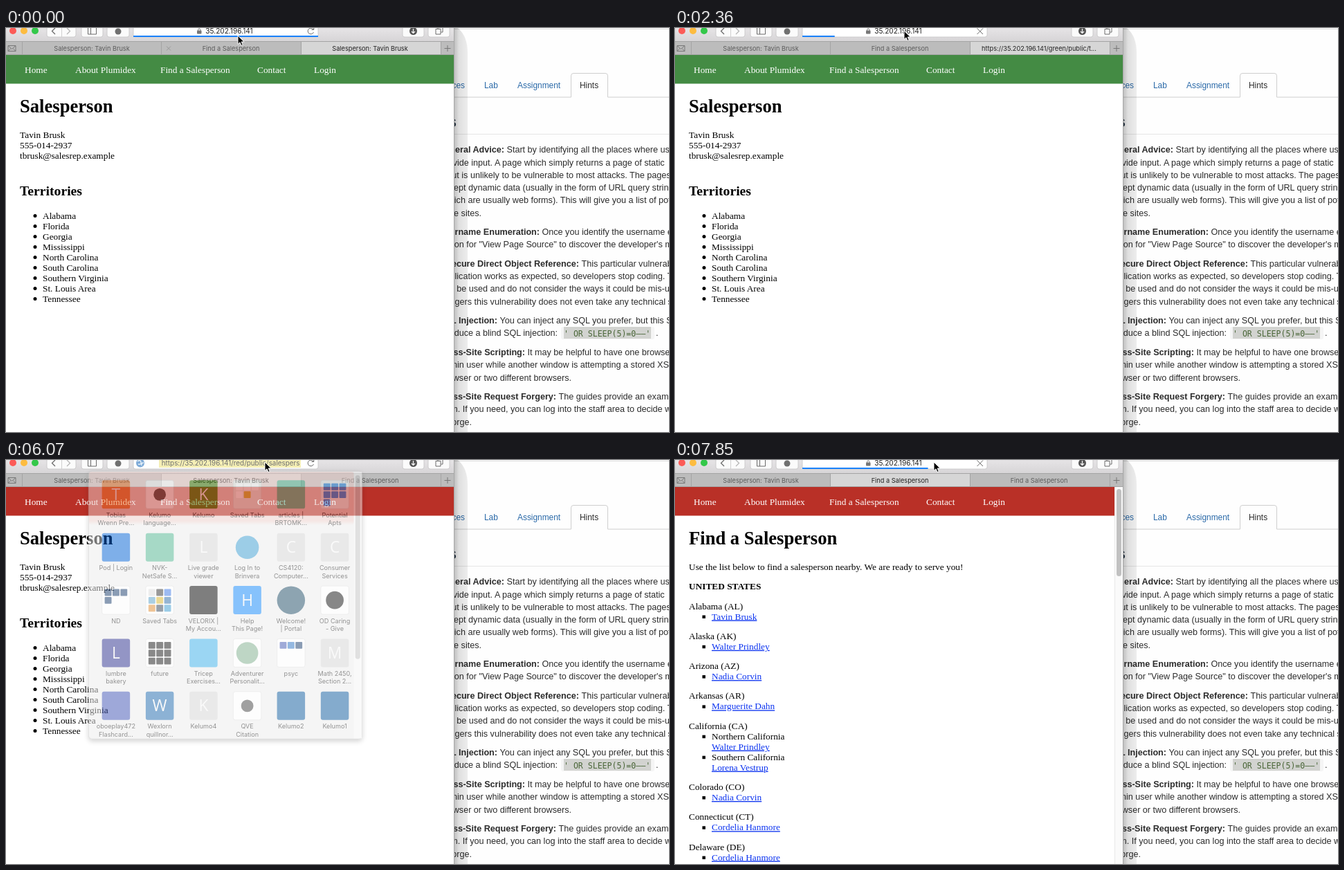
Write an HTML page that moves like this. It is 958 px wide and 584 px high and loops after 8000 ms.

```html
<!DOCTYPE html>
<html lang="en">
<head>
<meta charset="utf-8">
<title>Browser session</title>
<style>
html, body { margin: 0; width: 100%; height: 100%; overflow: hidden; background: #fff; }
svg { display: block; width: 958px; height: 584px; }
text { white-space: pre; }
.ui { font-family: Inter, sans-serif; }
.serif { font-family: "Liberation Serif", serif; font-size: 13.33px; }
.sans { font-family: "Liberation Sans", sans-serif; font-size: 12.6px; fill: #2c2c2c; }
.b { font-weight: bold; }
.mid { text-anchor: middle; }
.end { text-anchor: end; }
.link { fill: #0a32f0; text-decoration: underline; }
</style>
</head>
<body>
<svg id="stage" viewBox="0 0 958 584"></svg>
<script>
const text = (x, y, s, more = '') => `<text x="${x}" y="${y}" ${more}>${s}</text>`;
const rect = (x, y, w, h, fill, more = '') =>
  `<rect x="${x}" y="${y}" width="${w}" height="${h}" fill="${fill}" ${more}/>`;
const disc = (x, y, r, fill, more = '') => `<circle cx="${x}" cy="${y}" r="${r}" fill="${fill}" ${more}/>`;
const line = (d, stroke, w = 1, more = '') =>
  `<path d="${d}" fill="none" stroke="${stroke}" stroke-width="${w}" ${more}/>`;
const group = (id, body, more = '') => `<g id="${id}" ${more}>${body}</g>`;

const rep = 'Tavin Brusk';
const repTitle = 'Salesperson: ' + rep;
const listTitle = 'Find a Salesperson';
const ip = '35.202.196.141';

// Page behind the browser window
function guide() {
  const bold = [
    [180, 'General Advice:', 720, 'Start by identifying all the places where users'],
    [299, 'Username Enumeration:', 771, 'Once you identify the username enum'],
    [345, 'Insecure Direct Object Reference:', 828, 'This particular vulnerability'],
    [427, 'SQL Injection:', 710, 'You can inject any SQL you prefer, but this SQL'],
    [473, 'Cross-Site Scripting:', 750, 'It may be helpful to have one browser'],
    [537, 'Cross-Site Request Forgery:', 795, 'The guides provide an example']
  ];
  const plain = [
    [199, 'provide input. A page which simply returns a page of static'],
    [217, 'input is unlikely to be vulnerable to most attacks. The pages'],
    [235, 'accept dynamic data (usually in the form of URL query strings'],
    [253, '(which are usually web forms). This will give you a list of potential'],
    [317, 'option for "View Page Source" to discover the developer\'s mistake'],
    [363, 'application works as expected, so developers stop coding. The'],
    [381, 'can be used and do not consider the ways it could be mis-used'],
    [400, 'dangers this vulnerability does not even take any technical skill'],
    [491, 'admin user while another window is attempting a stored XSS'],
    [555, 'form. If you need, you can log into the staff area to decide what']
  ];
  const tails = [[272, 'these sites.', 687], [445, 'produce a blind SQL injection:', 797],
    [510, 'browser or two different browsers.', 817], [574, 'to forge.', 673]];
  const blue = 'style="fill:#2a69a8;font-size:11.9px"';
  return rect(640, 0, 318, 584, '#fefefe') + line('M648 1.5H958', '#dcdcdc') +
    line('M648 100H816.5V69Q816.5 65.500 820 65.500H866Q869.500 65.500 869.500 69V100H958', '#cfcfcf') +
    text(663, 87, 'Resources', 'class="end" ' + blue) + text(691, 87, 'Lab', blue) +
    text(739, 87, 'Assignment', blue) + text(829, 87, 'Hints', 'style="font-size:11.9px"') +
    text(651, 143, 'Hints', 'class="b end" style="font-size:22px;fill:#2b3a4a"') +
    line('M648 153.500H958', '#e6e6e6') +
    bold.map(([y, head, x, rest]) => text(x, y, head, 'class="b end"') + text(x + 3.500, y, rest)).join('') +
    plain.map(([y, s]) => text(627.500, y, s)).join('') +
    tails.map(([y, s, x]) => text(x, y, s, 'class="end"')).join('') +
    rect(802, 432, 135, 18, '#f5f5f5', 'rx="3"') + rect(806, 432, 126, 17, '#d2d3d0') +
    text(806, 445.500, "' OR SLEEP(5)=0——'",
      'style="font-family:\'DejaVu Sans Mono\',monospace;font-size:11.55px;fill:#4a6638"') +
    text(939, 445, '.');
}

function nav() {
  const items = [['Home', 27], ['About Plumidex', 100], [listTitle, 223], ['Contact', 363], ['Login', 445]];
  return rect(0, 38, 648, 42.500, '#448b44', 'id="bar"') +
    items.map(([s, x]) => text(x, 65, s, 'fill="#fff"')).join('');
}

function person() {
  const areas = ['Alabama', 'Florida', 'Georgia', 'Mississippi', 'North Carolina', 'South Carolina',
    'Southern Virginia', 'St. Louis Area', 'Tennessee'];
  return text(20, 122, 'Salesperson', 'class="b" font-size="26.6"') +
    [rep, '555-014-2937', 'tbrusk@salesrep.example'].map((s, i) => text(20, 159 + i * 15, s)).join('') +
    text(20, 242, 'Territories', 'class="b" font-size="19.7"') +
    areas.map((s, i) => disc(42, 271.500 + i * 15, 2.500, '#000') + text(53, 275.500 + i * 15, s)).join('');
}

function list() {
  const walter = 'Walter Prindley', nadia = 'Nadia Corvin', cora = 'Cordelia Hanmore';
  const states = [['Alabama (AL)', rep], ['Alaska (AK)', walter], ['Arizona (AZ)', nadia],
    ['Arkansas (AR)', 'Marguerite Dahn'],
    ['California (CA)', 'Northern California', walter, 'Southern California', 'Lorena Vestrup'],
    ['Colorado (CO)', nadia], ['Connecticut (CT)', cora], ['Delaware (DE)', cora]];
  let y = 215.500;
  let out = text(20, 122, listTitle, 'class="b" font-size="26.6"') +
    text(20, 159, 'Use the list below to find a salesperson nearby. We are ready to serve you!') +
    text(20, 187, 'UNITED STATES', 'class="b"');
  for (const [state, ...rows] of states) {
    out += text(20, y, state);
    rows.forEach((s, i) => {
      y += 15;
      if (i % 2 === 0) out += rect(39.500, y - 6, 4.500, 4.500, '#000');
      out += text(53, y, s, rows.length === 1 || i % 2 ? 'class="link"' : '');
    });
    y += 28.300;
  }
  return out + rect(635, 39, 13, 545, '#fafafa') + line('M635.500 39V584', '#e8e8e8') +
    rect(638, 42, 7, 126, '#c1c1c1', 'rx="3.5"');
}

function chrome() {
  const button = (x, w) => rect(x, -8, w, 21, '#fbfbfb', 'rx="3" stroke="#c6c4c6" stroke-width=".8"');
  const ink = '#6a6a6a';
  return rect(0, 0, 648, 20, 'url(#metal)') +
    disc(10, 4, 5, '#fc5b57') + disc(26, 4, 5, '#fdbc40') + disc(42, 4, 5, '#34c84a') +
    button(59, 42) + line('M80.500 0V13', '#d0d0d0') +
    line('M71 0L66.500 4.500L71 9', ink, 1.300) + line('M88 0L92.500 4.500L88 9', '#b5b5b5', 1.300) +
    button(109, 31) + line('M118.500 -2H130.500V9H118.500ZM122.500 0V9', ink) +
    button(146, 32) + disc(162, 5, 4.500, '#707070') +
    button(573, 31) + disc(588.500, 4.500, 5.500, '#555') +
    line('M588.500 1V7M586 5L588.500 7.500L591 5', '#fff', 1.200) +
    button(610, 31) + line('M621 1.500H628V9H621ZM624 1V-1H631V6H628.500', ink) +
    rect(184, -8, 267, 21, '#fff', 'id="field" rx="3"') + rect(184, 11, 0, 2, '#1a82fb', 'id="load"') +
    group('idle', rect(276, 3.500, 6.500, 5, '#777', 'rx="1"') +
      line('M277.500 4V2.500A1.800 1.800 0 0 1 281 2.500V4', '#777') +
      text(322.500, 8.300, ip, 'class="mid" font-size="10.1" fill="#222"')) +
    group('edit', rect(203, 0, 223, 11, '#f1e88f', 'id="mark"') +
      text(424.500, 8.300, '', 'id="url" class="end" font-size="9.9" fill="#222" clip-path="url(#cut)"') +
      line('M424.500 0V11', '#2f6fe0', 1, 'id="caret"') +
      disc(194, 4.500, 6, '#3b7fc4') +
      line('M190 2Q194 -1 195 3T191 6M196 8Q195 4 199 4', '#dcebf5', 1.400)) +
    line('M444 2A4.300 4.300 0 1 0 444.500 6M444.800 -1V2.500H441.500', ink, 1, 'id="reload"') +
    line('M436.500 0.500L445 9M445 0.500L436.500 9', ink, 1, 'id="stop"') +
    rect(0, 19, 648, 20, '#bcbcbc') + rect(225, 20, 201, 18, '#d6d6d6', 'id="tab"') +
    line('M0 19.500H648M0 38.500H648M23.500 19V38M224.500 19V38M426.500 19V38M628.500 19V38', '#a4a4a4') +
    line('M3 25.500H14V33.500H3ZM3 25.500L8.500 30.500L14 25.500M3 33.500L7 29.500M14 33.500L10 29.500', '#777') +
    line('M638 25V34M633.500 29.500H642.500', '#777') +
    line('M232 26.500L238 32.500M238 26.500L232 32.500', '#999', 1, 'id="close"') +
    [124, 325, 526].map((x, i) => text(x, 32.500, '', `id="t${i}" class="mid" font-size="9.2"`)).join('');
}

// Favourites: kind, colour(s), label lines, letter, radius or tile colour
function favourites() {
  const grey = '#d5d5d5', navy = '#173b6c', sky = '#1a7fe0', ink = '#151515', gold = '#d8b52c';
  const tiles = [
    ['sq', '#ee7a30', 'Tobias|Wrenn Pre...', 'T'], ['dot', '#444', 'Kelumo|language...', 9],
    ['sq', '#3e7d06', 'Kelumo', 'K'], ['grid', ['#fff', '#fff', '#fff', '#fff', gold], 'Saved Tabs', '#eceee9'],
    ['sq', '#4fb58f', 'articles ¦|BRTOMK...'], ['grid', Array(7).fill(sky), 'Potential|Apts', '#eef3f3'],
    ['sq', '#0061d5', 'Pod ¦ Login'], ['sq', '#4fb58f', 'NVK-|NetSafe S...'],
    ['sq', grey, 'Live grade|viewer', 'L'], ['dot', '#3c9cd0', 'Log In to|Brinvera', 17, 1],
    ['sq', grey, 'CS4120:|Computer...', 'C'], ['sq', grey, 'Consumer|Services', 'C'],
    ['grid', [navy, navy, navy, navy], 'ND', '#fcfcfc'],
    ['grid', ['#ddd', '#333', '#3b78e7', '#5aa0c8', gold, '#2b6ca8', '#e08a30', '#345', '#3a9ad0'], 'Saved Tabs', '#fcfcfc'],
    ['sq', '#000', 'VELORIX ¦|My Accou...'], ['sq', '#0f86fb', 'Help|This Page!', 'H'],
    ['dot', '#1d4c66', 'Welcome!|¦ Portal', 20.500, 1], ['dot', '#111', 'OD Caring|- Give', 13],
    ['sq', '#2a2e8c', 'lumbre|bakery', 'L'], ['grid', Array(9).fill(ink), 'future', '#fcfcfc'],
    ['sq', '#3aaee8', 'Tricep|Exercises...'], ['dot', '#7fae8c', 'Adventurer|Personalit...', 16],
    ['grid', ['#4257b2', '#2c73c4', navy], 'psyc', '#fcfcfc'], ['sq', grey, 'Math 2450,|Section 2...', 'M'],
    ['sq', '#3f54b4', 'oboeplay472|Flashcard...'], ['sq', '#1b67ac', 'Wexlorn|quillnor...', 'W'],
    ['sq', grey, 'Kelumo4', 'K'], ['dot', '#444', 'QVE|Citation', 9],
    ['sq', '#0b5a9c', 'Kelumo2'], ['sq', '#0b5a9c', 'Kelumo1']
  ];
  return tiles.map(([kind, color, label, arg, bare], i) => {
    const cx = 157 + i % 6 * 64, top = 30 + Math.floor(i / 6) * 77.300;
    const tile = (fill, edge = 'none') =>
      rect(cx - 20.500, top - .5, 41, 41.500, fill, `rx="3" stroke="${edge}" stroke-width=".7"`);
    let art;
    if (kind === 'sq') {
      art = tile(color) + (arg ? text(cx, top + 28.500, arg,
        'class="mid" style="font:23px \'Open Sans\',sans-serif" fill="#f6f6f6"') : '');
    } else if (kind === 'dot') {
      art = (bare ? '' : tile('#fcfcfc', '#d4d4d4')) + disc(cx, top + 20.300, arg, color);
    } else {
      art = tile(arg, '#d4d4d4') + color.map((c, j) =>
        rect(cx - 16.500 + j % 3 * 11.500, top + 4 + Math.floor(j / 3) * 11.500, 10, 10, c, 'rx="1"')).join('');
    }
    return art + label.split('|').map((s, j) =>
      text(cx, top + 53.600 + j * 11.500, s.replace('¦', '|'), 'class="mid" font-size="9.2" fill="#2a2a2a"')).join('');
  }).join('');
}

const popover = () =>
  rect(117, 16, 400, 392, '#ececec', 'rx="5" stroke="#b4b4b4" stroke-width=".8" filter="url(#shade)"') +
  rect(117.500, 17, 387.500, 78, 'url(#fade)', 'rx="4"') + rect(505, 17, 11.500, 390, '#f5f5f5') +
  rect(507, 22, 7, 269, '#c2c2c2', 'rx="3.5"') + favourites();

const pointers = () =>
  group('arrow', '<path d="M0 0V12.500L3 9.800L5 14.500L7.200 13.500L5.200 9H9.200Z" stroke="#fff"/>') +
  group('beam', line('M-2.500 -6Q0 -6 0 -4V5Q0 7 -2.500 7M2.500 -6Q0 -6 0 -4M0 5Q0 7 2.500 7M-1.500 1H1.500', '#222', 1.100)) +
  group('hand', '<path d="M2 1Q3.500 -0.500 4.500 1V5Q6 4 7 5.500Q8.500 5 9 6.200Q11 6 11 8V10L9.500 14H4L0 8.500Q0 7 2 8Z" fill="#fff" stroke="#000"/>');

const stage = document.getElementById('stage');
stage.innerHTML = `<defs>
  <linearGradient id="metal" x2="0" y2="1"><stop stop-color="#e6e4e6"/><stop offset="1" stop-color="#d6d4d6"/></linearGradient>
  <linearGradient id="edge"><stop stop-color="#000" stop-opacity=".24"/><stop offset=".35" stop-color="#000" stop-opacity=".12"/><stop offset="1" stop-color="#000" stop-opacity=".07"/></linearGradient>
  <linearGradient id="fade" x2="0" y2="1"><stop id="tint"/><stop offset=".92" id="tint2"/><stop offset="1" stop-color="#ececec"/></linearGradient>
  <filter id="shade" x="-10%" y="-10%" width="120%" height="120%"><feDropShadow dx="0" dy="3" stdDeviation="4" flood-opacity=".35"/></filter>
  <clipPath id="cut"><rect x="200" y="-5" width="226" height="20"/></clipPath></defs>` +
  group('guide', guide(), 'class="sans"') +
  '<path d="M648 0H653Q667 12 667 36V584H648Z" fill="url(#edge)"/>' +
  rect(0, 0, 648, 584, '#fff') +
  group('page', nav() + group('person', person()) + group('list', list()), 'class="serif"') +
  group('chrome', chrome(), 'class="ui"') + line('M647.500 0V584', '#a8a8a8') +
  group('pop', popover(), 'class="ui"') + pointers();

const el = id => document.getElementById(id);
const set = (id, attrs) => { for (const a in attrs) el(id).setAttribute(a, attrs[a]); };
const show = (id, on) => { el(id).style.display = on ? '' : 'none'; };
const within = (k, a, b) => k >= a && k <= b;

// Pointer stops and page loading, by step
const path = [[0, 335, 11], [3, 331, 4], [17, 331, 4], [21, 366, 26], [23, 374, 28], [24, 374, 28],
  [28, 274, 67], [29, 274, 67], [32, 89, 226], [34, 89, 226], [39, 374, 3], [54, 374, 3]];
const loads = { 0: 1, 13: .05, 14: .09, 15: .13, 16: .175, 17: .7, 18: 1, 19: 1, 34: .2, 35: .6, 36: 1, 51: .1, 52: .175, 53: .68 };

function pointerAt(k) {
  const i = Math.max(1, path.findIndex(p => p[0] >= k));
  const [a, b] = [path[i - 1], path[i]];
  const u = (k - a[0]) / (b[0] - a[0]);
  return [1, 2].map(j => a[j] + (b[j] - a[j]) * u);
}

function draw(k) {
  const red = k >= 21;
  const isList = within(k, 17, 34) || k >= 53;
  const site = `${ip}/${red ? 'red' : 'green'}/public/`;
  const active = red ? 1 : 2;

  show('person', !isList);
  show('list', isList);
  set('bar', { fill: red ? '#b93027' : '#448b44', width: isList ? 635 : 648 });

  const titles = [repTitle,
    k === 52 ? `https://${site}te...` : within(k, 35, 51) ? repTitle : listTitle,
    k < 15 ? repTitle : k < 17 ? `https://${site}t...` : listTitle];
  titles.forEach((s, i) => {
    el('t' + i).textContent = s;
    set('t' + i, { fill: i === active ? '#222' : '#5c5c5c' });
  });
  set('tab', { x: active === 1 ? 225 : 427 });
  show('close', k === 0 || within(k, 20, 26));

  const load = loads[k] || 0;
  set('load', { width: 267 * load });
  show('stop', load > 0 && load < 1);
  show('reload', !load || load === 1);

  // Address editing and the favourites sheet
  const open = within(k, 4, 12) || within(k, 41, 50);
  const fading = [4, 12, 41, 50].includes(k);
  const focus = open && !fading;
  const marked = within(k, 4, 6) || within(k, 41, 43);
  const id = [7, 10, 44, 45, 47].includes(k) ? '1' : within(k, 11, 12) || k >= 48 ? '13' : '';
  show('edit', open);
  show('idle', !open);
  show('mark', marked);
  show('caret', open && !marked);
  el('edit').style.opacity = fading ? .65 : 1;
  el('url').textContent = marked
    ? `https://${site}salespers${red ? '' : 'o'}` : `https://${site}salesperson.php?id=${id}`;
  set('mark', { x: red ? 221 : 203, width: red ? 205 : 223 });
  set('field', { stroke: focus ? '#79abf0' : '#c6c4c6', 'stroke-width': focus ? 3 : .8 });

  show('pop', open);
  el('pop').style.opacity = fading ? .5 : 1;
  set('pop', { transform: fading ? 'translate(317 16) scale(.988) translate(-317 -16)' : '' });
  for (const stop of ['tint', 'tint2']) set(stop, { 'stop-color': red ? '#eccfca' : '#cfe3cf' });

  const beam = within(k, 5, 11) || within(k, 42, 49);
  const hand = within(k, 32, 34);
  const [x, y] = pointerAt(k);
  show('beam', beam);
  show('hand', hand);
  show('arrow', !beam && !hand);
  set('beam', { transform: `translate(${red ? 375 : 332} 6.5)` });
  set('hand', { transform: `translate(${x - 1} ${y - 1})` });
  set('arrow', { transform: `translate(${x} ${y})` });
}

const start = performance.now();
function tick() {
  const t = (performance.now() - start) % 8000;
  draw(Math.min(53, Math.floor((t + 15) / 148.2)));
  requestAnimationFrame(tick);
}
tick();
</script>
</body>
</html>
```
